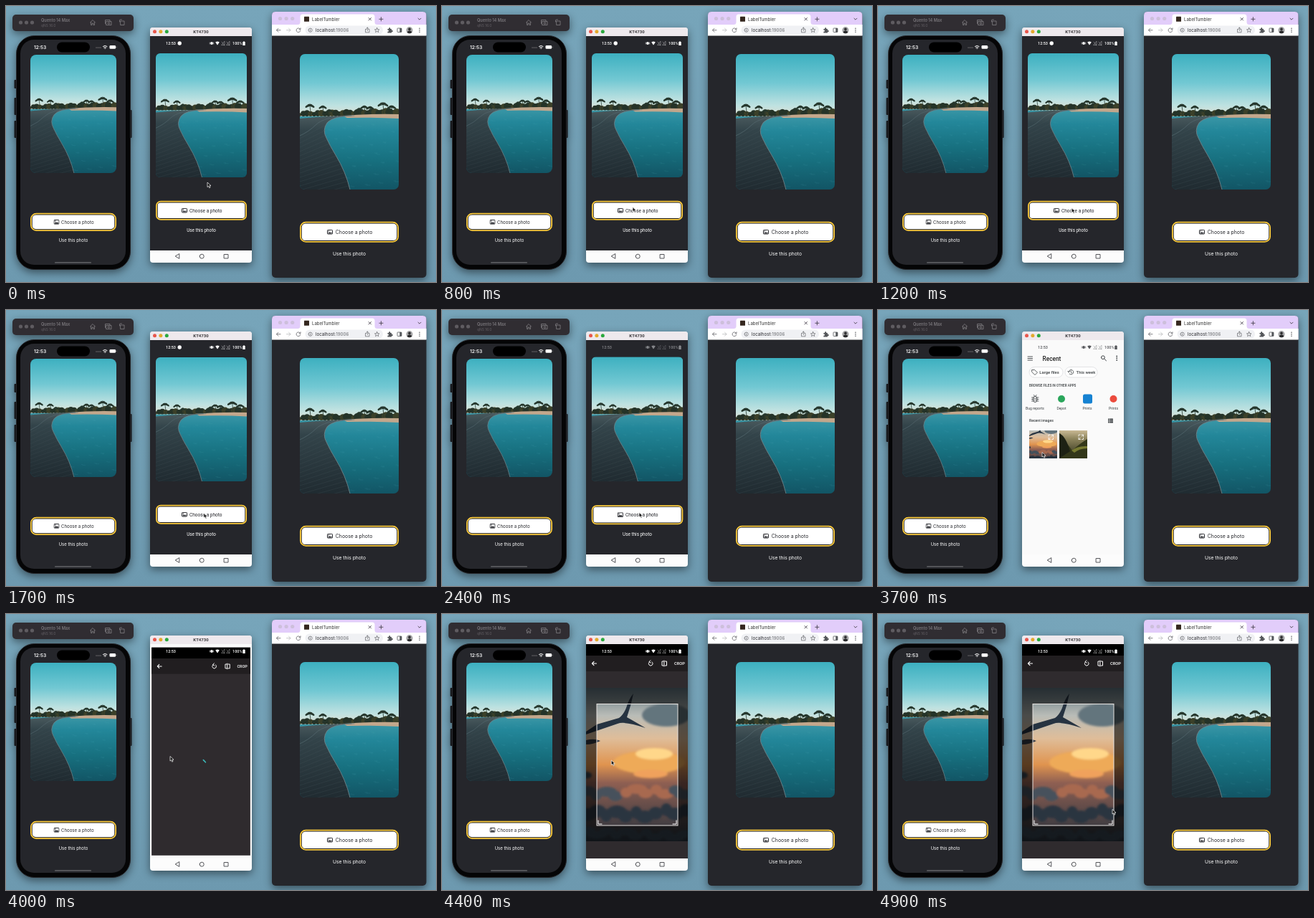
Recreate the animation shown at these times as an HTML page. Size 600 by 385 pixels, loop 5 s.

```html
<!DOCTYPE html>
<html lang="en">
<head>
<meta charset="utf-8">
<title>Choose a photo</title>
<style>
html, body { margin: 0; width: 100%; height: 100%; overflow: hidden; background: #729fb5; }
svg { display: block; width: 600px; height: 385px; }
text { font-family: Inter, "Liberation Sans", sans-serif; white-space: pre; }
.droid text { font-family: Roboto, "Liberation Sans", sans-serif; }
.line { fill: none; stroke: currentColor; stroke-width: .9; stroke-linecap: round; stroke-linejoin: round; }
.shadow { filter: drop-shadow(0 4px 6px #0007); }
</style>
</head>
<body>
<svg id="stage" viewBox="0 0 600 385"></svg>
<script>
const stage = document.getElementById('stage');
const DARK = '#25262b';

const rect = (x, y, w, h, r, fill, more = '') =>
  `<rect x="${x}" y="${y}" width="${w}" height="${h}" rx="${r}" fill="${fill}" ${more}/>`;
const dot = (x, y, r, fill) => `<circle cx="${x}" cy="${y}" r="${r}" fill="${fill}"/>`;
const text = (x, y, size, str, fill = '#fff', weight = 400, anchor = 'start') =>
  `<text x="${x}" y="${y}" font-size="${size}" fill="${fill}" font-weight="${weight}" text-anchor="${anchor}">${str}</text>`;
const line = (d, color, width = .9) =>
  `<path class="line" d="${d}" style="color:${color};stroke-width:${width}"/>`;
const use = (id, x, y, w, h) => `<use href="#${id}" x="${x}" y="${y}" width="${w}" height="${h}"/>`;
const lights = (x, y, step, r, colors) => colors.map((c, i) => dot(x + i * step, y, r, c)).join('');

const gradient = (id, ...stops) => `<linearGradient id="${id}" x2="0" y2="1">` +
  stops.map(([o, c]) => `<stop offset="${o}" stop-color="${c}"/>`).join('') + '</linearGradient>';

function palm(x, y, base, s) {
  let fronds = '';
  for (let i = 0; i < 7; i++) {
    const a = Math.PI * (1 + i / 6) + (i - 3) * .12;
    const dx = Math.cos(a) * s, dy = Math.sin(a) * s * .6;
    fronds += `M${x} ${y}q${dx * .5} ${dy - .6} ${dx} ${dy * .4 + s * .3}`;
  }
  return line(`M${x} ${y}Q${x + 1.5} ${(y + base) / 2} ${x + .6} ${base}`, '#29382f', .8) +
    line(fronds, '#25362c', 1.4);
}

function beach() {
  const rim = 'Q46 86 38 96Q31 106 37 117Q42 128 50 141Q64 164 70 189';
  let trees = '', planks = '', ripples = '';
  for (let i = 0; i < 28; i++) {
    const r = 2.4 + i / 14 + 1.8 * Math.abs(Math.sin(i * 2.3));
    trees += dot(i * 5, 87 - r, r, i % 3 ? '#253328' : '#3b4029');
  }
  for (let i = 0; i < 16; i++) {
    const y = 100 + i * 6;
    planks += `M0 ${y + 18}L${34 + i * 2.4} ${y}`;
  }
  for (let i = 0; i < 80; i++) {
    const x = 30 + i * 37 % 108, y = 92 + i * 23 % 97;
    ripples += `M${x} ${y}h${2 + i % 4}`;
  }
  return `<symbol id="beach" viewBox="0 0 138 189" preserveAspectRatio="none">
    ${rect(0, 0, 138, 90, 0, 'url(#sky)')}
    ${trees}
    ${[[14, 72, 6], [32, 74, 5], [41, 79, 4], [83, 77, 4], [90, 74, 5], [98, 75, 5], [116, 70, 7], [128, 74, 6]]
      .map(([x, y, s]) => palm(x, y, 86, s)).join('')}
    ${rect(0, 87, 138, 102, 0, 'url(#sea)')}
    <path d="M60 86Q100 83 138 84V90Q105 88 66 89Z" fill="#c3a78c"/>
    ${line(ripples, '#4ba5b033', .7)}
    <path d="M76 86${rim}H0V90Q40 86 76 86Z" fill="url(#deck)"/>
    ${line(planks, '#53606440', .8)}
    ${line('M76 86' + rim, '#6f8388', .9)}
    ${line('M72 86Q34 87 22 99Q13 108 0 114', '#52666c', .8)}
  </symbol>`;
}

const cloud = (x, y, rx, ry, fill) => `<ellipse cx="${x}" cy="${y}" rx="${rx}" ry="${ry}" fill="${fill}"/>`;

function flight() {
  let puffs = '';
  for (let i = 0; i < 34; i++) {
    const x = i * 41 % 150, y = 122 + i * 29 % 88;
    const warm = x > 42 && x < 120 && y < 165;
    puffs += cloud(x, y, 8 + i % 4 * 2, 5 + i % 3 * 2,
      warm ? ['#d9865a', '#a8694f', '#e9a267'][i % 3] : ['#35434f', '#46515b', '#29343f'][i % 3]);
  }
  return `<symbol id="flight" viewBox="0 0 142 214" preserveAspectRatio="none">
    ${rect(0, 0, 142, 214, 0, 'url(#dusk)')}
    <g filter="url(#soft)">${cloud(88, 104, 50, 16, '#eeaa58')}${cloud(95, 92, 26, 8, '#ffd78a')}${cloud(112, 38, 34, 16, '#64747d')}
      ${puffs}${cloud(90, 120, 24, 6, '#f0a15c')}</g>
    <path d="M66 8Q60 15 56 28Q52 38 46 42L15 51L0 61V65L44 50Q54 46 83 56Q66 46 57 41Q63 24 66 8Z" fill="#263341"/>
    <path d="M0 73Q12 70 20 74Q10 79 0 79Z" fill="#333a45"/>
  </symbol>`;
}

const defs = `<defs>
  ${gradient('wall', [0, '#77a5ba'], [1, '#6d99af'])}
  ${gradient('sky', [0, '#3db0c0'], [.45, '#72c8d3'], [.8, '#bfe2e1'], [1, '#e6dfd0'])}
  ${gradient('sea', [0, '#3a96a6'], [.2, '#23879a'], [.6, '#17707f'], [1, '#125565'])}
  ${gradient('deck', [0, '#4a5a5e'], [.2, '#33444a'], [1, '#202b31'])}
  ${gradient('dusk', [0, '#5f747f'], [.18, '#b9bcb7'], [.33, '#dfbd99'], [.5, '#e0944f'], [.62, '#8e5f52'], [1, '#26313c'])}
  ${gradient('hill', [0, '#c9b994'], [.3, '#8d845c'], [1, '#2a2c17'])}
  <filter id="soft"><feGaussianBlur stdDeviation="1.8"/></filter>
  <clipPath id="c1">${rect(34, 68, 120, 165, 8, 0)}</clipPath>
  <clipPath id="c2">${rect(209, 66, 127, 173, 6, 0)}</clipPath>
  <clipPath id="c3">${rect(410, 67, 138, 189, 7, 0)}</clipPath>
  <clipPath id="screen">${rect(201, 42, 142, 299, 0, 0)}</clipPath>
  <clipPath id="thumb">${rect(211, 168, 39, 39, 0, 0)}</clipPath>
  ${beach()}${flight()}
  <symbol id="picture" viewBox="0 0 8 7">
    ${rect(.5, .6, 7, 5.8, .8, 'none', 'stroke="#25262b"')}
    <path d="M1 5.8L3 3.2L4.3 4.6L5.4 3.4L7 5.8Z" fill="#25262b"/>${dot(2.3, 2.2, .7, DARK)}
  </symbol>
</defs>`;

// Photo, framed button and caption, shared by all three devices.
function app(clip, [x, y, w, h], top, high, r, size, iconX, textX, capY) {
  const mid = x + w / 2, base = top + high / 2 + size * .36;
  return `<g clip-path="url(#${clip})">${use('beach', x, y, w, h)}</g>` +
    rect(x + .9, top + .9, w - 1.8, high - 1.8, r, '#19191c', 'stroke="#fccb3c" stroke-width="1.8"') +
    rect(x + 2.7, top + 2.7, w - 5.4, high - 5.4, r - 2.5, '#fff') +
    use('picture', iconX, top + high / 2 - 3.5, 8, 7) +
    text(textX, base, size, 'Choose a photo', DARK) +
    text(mid, capY, size * .98, 'Use this photo', '#fff', 400, 'middle');
}

const simulator = `
  <g class="shadow">${rect(9, 12, 169, 23, 5, '#302d32')}</g>
  ${lights(20.5, 23, 8, 2.6, ['#5f5c61', '#5f5c61', '#5f5c61'])}
  ${text(49, 22.3, 5.6, 'Quento 14 Max', '#79767b', 600)}
  ${text(49, 28.7, 4.9, 'qNS 16.0', '#625f64')}
  ${line('M117.5 23L121 19.5L124.5 23M118.6 22.5V26.5H120V24.2H122V26.5H123.4V22.5M138.5 24.5V19.5H145V21M140 21.5H147V26.5H140ZM142.2 24a1.3 1.3 0 1 0 2.6 0a1.3 1.3 0 1 0 -2.6 0M160 21H165V26.5H160ZM158.5 22V20Q158.5 19 160 19H161.5', '#8d8a8f', .7)}
  <g class="shadow">
    ${[[103, 12], [128, 24], [160, 24]].map(([y, h]) => rect(11.5, y, 4, h, 1, '#17181c')).join('')}
    ${rect(172, 145, 3.5, 39, 1, '#17181c')}
    ${rect(14.5, 41.5, 159, 326, 25, '#050506', 'stroke="#26272b"')}
  </g>
  ${rect(20, 47, 147, 314, 19, DARK)}
  ${rect(71, 50.5, 46, 14, 7, '#000')}
  ${text(39, 60, 6.6, '12:53', '#fff', 600)}
  ${[0, 1, 2, 3].map(i => dot(126 + i * 2, 58, .6, '#aaa')).join('')}
  ${line('M135.4 56.4Q138.2 54 141 56.4M136.6 58Q138.2 56.6 139.8 58', '#fff', 1)}${dot(138.2, 59.3, .7, '#fff')}
  ${rect(144.5, 55, 8.5, 4.8, 1.3, '#fff')}${rect(153.5, 56.5, .8, 1.8, .3, '#bbb')}
  ${app('c1', [34, 68, 120, 165], 288.7, 25.3, 7.5, 6.1, 66.5, 77, 328.8)}
  ${rect(68, 357, 51, 1.8, .9, '#595a5e')}`;

const statusBar = `<g id="status">
  <text x="223" y="54.2" font-size="5.5" fill="currentColor" font-weight="500">12:53</text>
  <circle id="badge" cx="242.2" cy="52" r="2.7" fill="currentColor"/>
  <circle cx="287" cy="52" r="1.9" fill="currentColor"/>
  <path class="line" style="stroke-width:.6" d="M284.3 51V53M289.7 51V53"/>
  <path d="M292.2 50.6Q295 48.6 297.8 50.6L295 54.5Z" fill="currentColor"/>
  <path class="line" style="stroke-width:.6" opacity=".55" d="M301 54.5H305V49.5ZM301 50L305 55M308 54.5H312V49.5ZM308 50L312 55"/>
  <text x="316" y="54.2" font-size="5.5" fill="currentColor" font-weight="500">100%</text>
  <path d="M330.3 50h1v-.8h1.4v.8h1v5h-3.4Z" fill="currentColor"/>
</g>`;

const expand = x =>
  line(`M${x + 3} 174h2.5v2.5M${x + 5.5} 174l-2.3 2.3M${x - 1} 178v2.5h2.5M${x - 1} 180.5l2.3 -2.3M${x - 1} 176v-2h2M${x + 5.5} 178.5v2h-2`, '#fff', .8);
const ink = '#3c4043';
const chip = (x, w, label, tx) => rect(x, 79.5, w, 14.5, 7.2, '#fff', 'stroke="#dcdde0" stroke-width=".8"') +
  text(tx, 89, 5.9, label, ink, 500);
const label = (x, str) => text(x, 139, 5, str, ink, 400, 'middle');

const picker = `<g id="picker">
  ${rect(201, 42, 142, 299, 0, '#fafafa')}
  ${line('M209 65H215.5M209 67.5H215.5M209 70H215.5', ink)}
  ${text(229.5, 70.5, 8.3, 'Recent', '#222', 500)}
  ${line('M311.5 66.2a2.4 2.4 0 1 0 4.8 0a2.4 2.4 0 1 0 -4.8 0M315.8 68.2L318.5 70.8', ink, 1)}
  ${[64.5, 67.2, 69.9].map(y => dot(333.2, y, .9, ink)).join('')}
  ${chip(211, 47, 'Large files', 225.3)}${chip(261, 45, 'This week', 276.6)}
  ${line('M215 83.5H218.5L222.5 87.2L219 90.5L215 86.8ZM266 86.5a3.3 3.3 0 1 1 1 2.5M264.8 85.5L266 87L267.5 85.5M269.2 84.8V87L270.8 88', ink, .8)}
  ${text(211, 107, 4.6, 'BROWSE FILES IN OTHER APPS', ink, 500)}
  ${rect(216.7, 120.5, 5, 8, 2.5, 'none', `stroke="${ink}"`)}
  ${line('M214.5 122H216.5M214.5 124.5H216.5M214.5 127H216.5M222 122H224M222 124.5H224M222 127H224M217.5 118.5L218.5 120M221 118.5L220 120M218.2 123.4H220.2M218.2 125.7H220.2', ink, .8)}
  ${dot(256, 124, 5, '#2aa65b')}${rect(286, 117.5, 13, 13, 2.5, '#1682d2')}${dot(328.5, 124, 5, '#eb4b3d')}
  ${label(219, 'Bug reports')}${label(256, 'Depot')}${label(292, 'Prints')}${label(328.5, 'Prints')}
  ${text(211, 156.3, 5.1, 'Recent images', ink, 500)}
  ${rect(321, 151.5, 7, 6, .6, ink)}${line('M321 153.5H328M321 155.5H328M323 151.5V157.5', '#fafafa', .5)}
  <g clip-path="url(#thumb)">${use('flight', 211, 158, 39, 59)}</g>${expand(239)}
  ${rect(253, 168, 39, 39, 0, 'url(#hill)')}
  <path d="M253 177Q263 184 271 196Q282 186 292 180V207H253Z" fill="#333719"/>
  <path d="M253 172Q262 176 268 197L253 207Z" fill="#1d2113"/><path d="M270 196Q279 189 292 190V193Q281 193 274 199Z" fill="#777a31"/>
  ${expand(281)}
</g>`;

const cropper = `<g id="cropper">
  ${rect(201, 42, 142, 299, 0, '#2f2b2e')}
  ${rect(201, 42, 142, 16, 0, '#000')}
  ${rect(201, 58, 142, 22, 0, '#211e20')}
  ${line('M215.5 69H209.5M212 66.4L209.4 69L212 71.6', '#fff', 1.1)}
  ${line('M289.7 66.6a2.9 2.9 0 1 0 3.3 .2M291 64.6L289 66.6L291.4 68.2M309.9 65V73M309 66H307V72H309M311 66H313.5V72H311', '#fff', 1)}
  ${text(324, 71.2, 5.7, 'CROP', '#fff', 500)}
  <g id="spinner">${line('M275.5 203.8L278.6 207', '#3bb8b8', 1.7)}</g>
  <g id="crop">
    ${rect(201, 103, 142, 214, 0, '#000')}
    ${use('flight', 201, 103, 142, 214)}
    <path d="M201 103H343V317H201ZM216 125V295H329V125Z" fill="#0009"/>
    ${rect(216, 125.5, 113, 169.5, 0, 'none', 'stroke="#e5e2e0" stroke-width="1"')}
    ${line('M218 288V293H223M327 288V293H322', '#fff', 1)}
  </g>
</g>`;

const droid = `<g class="droid">
  <g class="shadow">${rect(201, 30, 142, 328, 4, '#fcfcfc')}</g>
  <path d="M201 42V34Q201 30 205 30H339Q343 30 343 34V42Z" fill="#eee9ed"/>
  ${lights(207.5, 35.7, 8.4, 2.5, ['#e8564c', '#e3a92c', '#2aa83d'])}
  ${text(272, 38.2, 6, 'KT4730', '#3a383b', 700, 'middle')}
  <g clip-path="url(#screen)">
    ${rect(201, 42, 142, 299, 0, DARK)}
    <g id="home">${app('c2', [209, 66, 127, 173], 271.8, 27, 6, 6.5, 245, 256, 314.8)}</g>
    ${picker}${cropper}${statusBar}
  </g>
  ${line('M241.8 346V352.4L236.5 349.2ZM270.2 349.2a3 3 0 1 0 6 0a3 3 0 1 0 -6 0M304.5 346.5H310V352H304.5Z', '#55565a', 1)}
</g>`;

const browser = `
  <g class="shadow">${rect(371, 8, 215.5, 371, 5, DARK)}</g>
  <path d="M371 41V13Q371 8 376 8H581.5Q586.5 8 586.5 13V41Z" fill="#e2cdfa"/>
  ${lights(382.5, 17.5, 8.6, 2.6, ['#cdbfdb', '#cdbfdb', '#cdbfdb'])}
  ${rect(371, 26, 215.5, 15.5, 0, '#fff')}
  <path d="M407 26Q410.5 26 410.5 22.5V15Q410.5 11.5 414 11.5H511Q514.5 11.5 514.5 15V22.5Q514.5 26 518 26Z" fill="#fff"/>
  ${rect(416, 14.8, 7, 7, .5, '#35271f')}
  ${text(427, 20.8, 6, 'LabelTumbler', '#333')}
  ${line('M506 16.5L509.5 20M509.5 16.5L506 20M520.8 18.3H526M523.4 15.7V20.9M575 17.2L577 19.2L579 17.2', '#4b4452', .9)}
  ${line('M383 33.7H377.5M380 31.2L377.5 33.7L380 36.2M410.6 32.5a2.9 2.9 0 1 0 .2 2M411 30.8V32.8H409', '#626367', .8)}
  ${line('M391.5 33.7H397M394.5 31.2L397 33.7L394.5 36.2', '#b9babd', .8)}
  ${rect(417.5, 27.5, 108.5, 12.3, 6.1, '#f0f1f4')}
  ${line('M422 33.7a2.6 2.6 0 1 0 5.2 0a2.6 2.6 0 1 0 -5.2 0M424.6 33.4V35M424.6 32V32.1', '#626367', .7)}
  ${text(432, 36, 6.2, 'localhost:<tspan fill="#66686c">19006</tspan>', '#25262b')}
  ${line('M502.7 32.5H501.5V36.8H507V32.5H505.8M504.3 34.5V30M502.8 31.5L504.3 30L505.8 31.5M517.7 30.5L518.6 32.7L521 32.9L519.2 34.4L519.8 36.7L517.7 35.4L515.6 36.7L516.2 34.4L514.4 32.9L516.8 32.7Z', '#626367', .7)}
  <path d="M532.4 32H534.2a1.2 1.2 0 1 1 2 0H538V34a1.2 1.2 0 1 1 0 2V37.4H532.4V35.6a1.1 1.1 0 1 0 0 -2Z" fill="#55575b"/>
  ${rect(546, 31, 6, 5.5, .7, 'none', 'stroke="#55575b" stroke-width=".8"')}${rect(549.3, 31, 2.7, 5.5, 0, '#55575b')}
  ${dot(563, 33.7, 4.6, '#a6a6a8')}${dot(563, 32.3, 1.8, '#29292b')}<path d="M559.5 36.7Q563 32 566.5 36.7Q563 39.8 559.5 36.7Z" fill="#29292b"/>
  ${[31.2, 33.7, 36.2].map(y => dot(577, y, .8, '#55575b')).join('')}
  ${app('c3', [410, 67, 138, 189], 300.8, 29, 7.5, 6.9, 448, 459.8, 347.5)}`;

stage.innerHTML = defs + rect(0, 0, 600, 385, 0, 'url(#wall)') + simulator + droid + browser +
  '<path id="cursor" d="M0 0V6.6L1.6 5.2L2.7 7.7L4 7.1L2.9 4.7H5Z" fill="#111" stroke="#fff" stroke-width=".7"/>';

const [home, pick, crop, photo, spinner, status, badge, cursor] =
  ['home', 'picker', 'cropper', 'crop', 'spinner', 'status', 'badge', 'cursor'].map(id => document.getElementById(id));

// Pointer stops: time, x, y
const stops = [[0, 281, 246], [800, 266, 280.5], [1700, 276, 283.5], [2400, 275, 282.5], [2600, 275, 282.5],
  [3100, 243, 228.5], [3700, 229, 198.5], [4300, 229, 198.5], [4900, 327, 272.5], [5000, 327, 272.5]];

const ramp = (t, from, to) => Math.min(1, Math.max(0, (t - from) / (to - from)));
const zoom = (el, s) => el.setAttribute('transform', `translate(272 200) scale(${s}) translate(-272 -200)`);
const show = (el, o) => el.setAttribute('opacity', o);

function draw(t) {
  const i = stops.findIndex((s, n) => t < stops[n + 1][0]);
  const [t0, x0, y0] = stops[i], [t1, x1, y1] = stops[i + 1];
  const p = ramp(t, t0, t1), e = p * p * (3 - 2 * p);
  cursor.setAttribute('transform', `translate(${x0 + (x1 - x0) * e} ${y0 + (y1 - y0) * e})`);

  zoom(home, t < 2400 ? 1 : 1.005);
  show(pick, ramp(t, 2400, 2700));
  zoom(pick, .94 + .06 * ramp(t, 2400, 2800));
  show(crop, ramp(t, 3800, 4000));
  zoom(crop, .94 + .06 * ramp(t, 3800, 4200));
  show(photo, ramp(t, 4200, 4400));
  show(spinner, t >= 4000 && t < 4300 ? 1 : 0);
  spinner.setAttribute('transform', `rotate(${(t - 4000) * .4} 272 200)`);
  status.style.color = t < 2400 || t >= 3900 ? '#fff' : t < 2600 ? '#85868a' : '#55575b';
  show(badge, t < 2400 ? 1 : 0);
}

function tick() {
  draw(Math.floor(performance.now() % 5000 / 100) * 100);
  requestAnimationFrame(tick);
}
tick();
</script>
</body>
</html>
```
